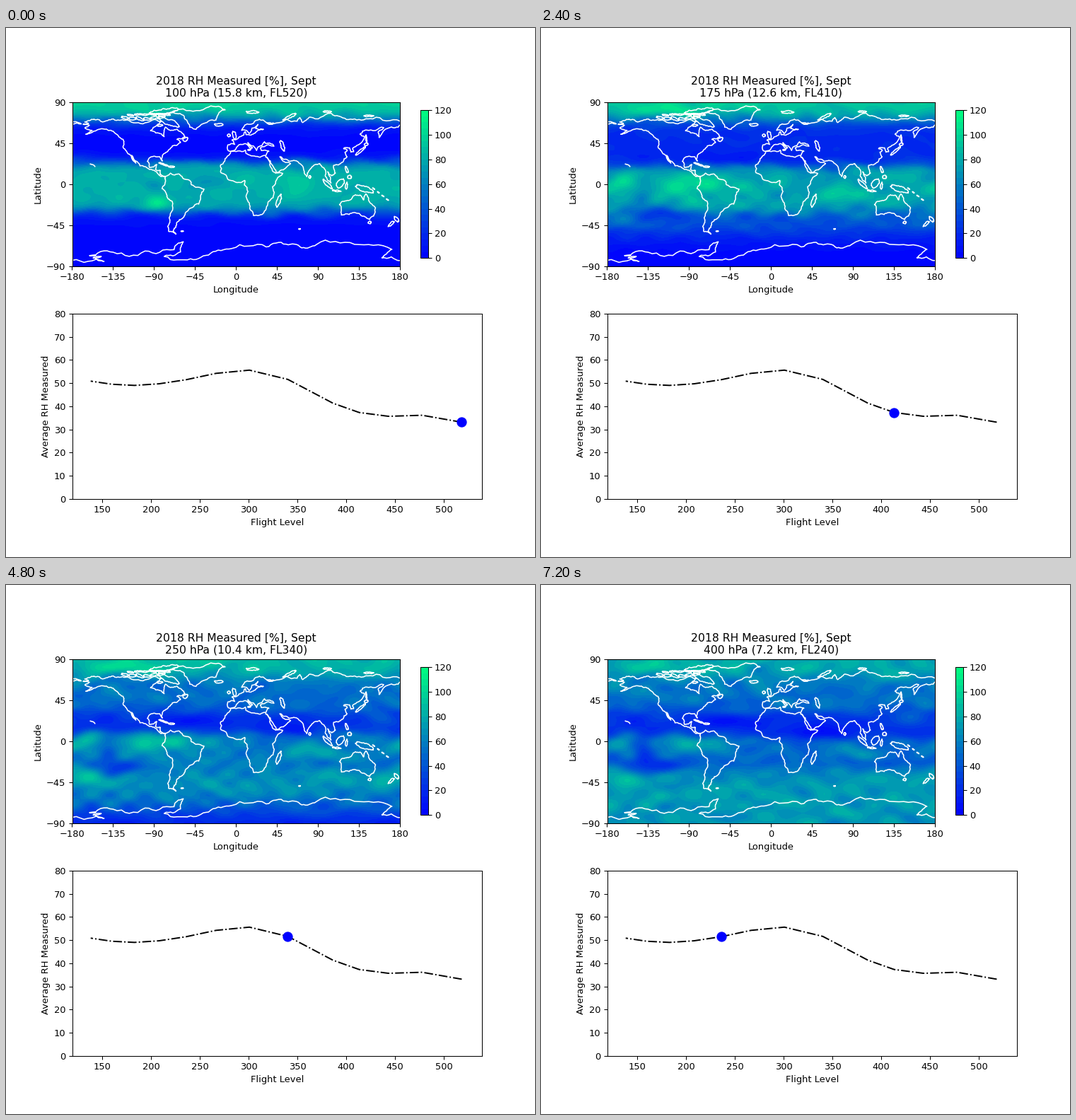
A matplotlib script for the animation above (8 s loop, 748x748 px).

```python
import numpy as np
import matplotlib.pyplot as plt
from matplotlib.animation import FuncAnimation

PRESSURES = [*range(100, 250, 25), *range(250, 601, 50)]
AVERAGE_RH = [33.1, 36.1, 35.65, 37.3, 41.3, 46.7, 51.6, 55.6, 54.2, 51.45,
              49.7, 49.0, 49.5, 50.85]
STEPS = 10
rng = np.random.default_rng(7)
lon, lat = np.meshgrid(np.linspace(-180, 180, 241), np.linspace(-90, 90, 121))

# Regional moist and dry areas: lon, lat, width, height, strength
HIGH = [(-86, -22, 14, 8, 28), (-90, 0, 14, 7, -13), (-33, 0, 18, 8, -16), (66, 0, 16, 10, 14)]
DEEP = [(-162, 0, 15, 10, 30), (-140, -12, 12, 16, -26), (-97, -1, 28, 13, 31),
        (-118, -30, 27, 9, -28), (-52, -3, 24, 12, 17), (84, -12, 22, 9, 18),
        (50, 9, 32, 9, -17), (-50, 23, 35, 8, -14), (-120, 81, 45, 6, 16),
        (-165, -42, 25, 8, 16), (150, 24, 26, 10, 14)]


def ease(p, start, end):
    t = np.clip((p - start) / (end - start), 0, 1)
    return t * t * (3 - 2 * t)


def step(x, edge, width):
    return 1 / (1 + np.exp((edge - x) / width))


def ripple(waves=60):
    """Smooth random field with a spread of about one, streaked along latitudes."""
    field = np.zeros_like(lon)
    for _ in range(waves):
        kx, ky = rng.integers(-10, 11), rng.uniform(4, 18)
        field += np.cos(np.radians(kx * lon + ky * lat) + rng.uniform(0, 2 * np.pi))
    return field / np.sqrt(waves / 2)


bend, detail, drift = ripple(), ripple(), ripple()


def humidity(p):
    """Tropical band, two middle latitudes and a northern cap, plus the regions."""
    y = lat + 1.2 * bend
    floor = 2 + 17 * ease(p, 100, 230)
    tropic = 82 - 32 * ease(p, 130, 320)
    north = 3 + 50 * ease(p, 120, 270)
    south = 3 + 68 * ease(p + 2.5 * np.minimum(0, y + 45), 90, 260)
    cap = 97 - 17 * ease(p, 100, 350)

    band = step(y, -30 + 8 * ease(p, 150, 320), 3.5) * step(-y, -24 + 21 * ease(p, 120, 320), 3)
    rh = floor + (tropic - floor) * band
    rh += (south - floor) * step(-y, 36 - 8 * ease(p, 100, 200), 4)
    rh += (north - floor) * step(y, 32, 4)
    rh += (cap - north) * step(y, 71, 4.5)

    depth = ease(p, 90, 210)
    for regions, weight in ((HIGH, 1 - depth), (DEEP, depth)):
        for x0, y0, w, h, strength in regions:
            dx = (lon - x0 + 180) % 360 - 180
            rh += weight * strength * np.exp(-(dx / w) ** 2 - ((lat - y0) / h) ** 2)
    turn = p / 150
    noise = detail * np.cos(turn) + drift * np.sin(turn)
    rh += (2 + 3 * depth) * noise * np.clip(rh / 50, 0, 1)
    return np.clip(rh, 0.5, 119)


fig, (sky, graph) = plt.subplots(2, 1, figsize=(8, 8), dpi=93.5)
layers = [sky.contourf(lon, lat, humidity(p), levels=np.arange(0, 121, 5), cmap="winter")
          for p in PRESSURES[:STEPS]]
fig.colorbar(layers[0], ax=sky, shrink=0.8, ticks=range(0, 121, 20))


def coast(*points):
    """Draw a shoreline through key points, roughened by midpoint displacement."""
    path = np.array(points, float)
    for _ in range(3):
        leg = np.diff(path, axis=0)
        normal = leg[:, ::-1] * [-1, 1]
        middle = path[:-1] + leg / 2 + normal * rng.uniform(-0.16, 0.16, (len(leg), 1))
        rough = np.empty((2 * len(path) - 1, 2))
        rough[::2], rough[1::2] = path, middle
        path = rough
    sky.plot(*path.T, color="white", lw=1.2)


def island(x, y, length, width, tilt=0):
    """Draw an uneven ellipse, tilted anticlockwise in degrees."""
    a = np.linspace(0, 2 * np.pi, 13)
    r = rng.uniform(0.75, 1.15, 13)
    r[-1] = r[0]
    u, v, t = length * r * np.cos(a), width * r * np.sin(a), np.radians(tilt)
    coast(*zip(x + u * np.cos(t) - v * np.sin(t), y + u * np.sin(t) + v * np.cos(t)))


# North America, west then east
coast((-156, 71), (-166, 68), (-162, 66.5), (-168, 65.6), (-161, 64.5), (-166, 61.6),
      (-158, 58.7), (-165, 54.6), (-151, 60), (-145, 60.4), (-135, 58), (-124, 49),
      (-124, 40), (-117, 32.7), (-110, 23), (-114.7, 31.5), (-105.5, 20), (-95, 16),
      (-87, 13), (-83, 8.4), (-78, 8))
coast((-78, 8.5), (-83.5, 10.5), (-83.2, 15), (-88.5, 16), (-87, 21.4), (-91, 18.7),
      (-95, 18.2), (-97.5, 25), (-94, 29.6), (-84, 30), (-81, 25.3), (-81, 31),
      (-75.7, 35.4), (-70, 42), (-61, 45.5), (-65, 49), (-56, 52), (-64.5, 60),
      (-69.5, 59), (-77.5, 62.5), (-79, 52), (-82, 55), (-94, 58.5), (-87, 64),
      (-82, 69), (-95, 68.5), (-115, 68), (-128, 70), (-141, 69.7), (-156, 71))
# Greenland
coast((-73, 78.3), (-58, 75.5), (-54, 70), (-51, 62.5), (-44, 60), (-38, 65.5), (-22, 70.3),
      (-19, 78), (-12, 81.5), (-33, 83.6), (-62, 82), (-73, 78.3))
# South America
coast((-78, 8), (-72, 12), (-62, 10.7), (-51, 4), (-49, -0.8), (-35.2, -5.5), (-39, -13),
      (-41, -22), (-48.5, -26), (-57, -35), (-62.2, -39), (-65, -42), (-66, -47),
      (-69, -51), (-66, -55), (-74, -52), (-75, -47), (-73.5, -37), (-70.2, -19),
      (-76, -14), (-81.3, -5), (-77.5, 4), (-78, 8))
# Africa
coast((32.6, 29.9), (37.3, 20), (43.2, 12), (51.2, 11.8), (40, -3), (40.6, -15),
      (35, -20), (32, -29), (27, -33.5), (19, -34.5), (15, -27), (12, -17), (13, -8),
      (9, -1), (9.5, 4), (-8, 4.5), (-16.7, 12.5), (-17, 21), (-10, 30), (-6, 35.8),
      (10, 37.2), (11, 33.5), (20, 30.8), (32.5, 31.2))
# Mediterranean, Black Sea and Atlantic Europe
coast((32.5, 31.2), (36, 36), (28, 36.7), (26.5, 39.5), (29, 41), (41.5, 41.5), (37, 45),
      (33.5, 44.5), (31, 46.5), (28, 42), (23.5, 40), (22.5, 36.8), (19.4, 41.5),
      (13, 45.5), (18, 40), (16, 38), (9, 44.3), (3.5, 43.3), (-1, 37.5), (-9, 37),
      (-9, 43), (-1.5, 43.5), (-4.6, 48.3), (3, 51.5), (8.5, 54), (10, 57.5),
      (11, 54.2), (21, 56), (24, 59), (30, 60), (21.5, 61), (24, 65.5), (17.5, 61.5),
      (14.5, 55.5), (11, 59), (6, 59), (12, 66), (25.5, 71))
# Northern and eastern Asia
coast((25.5, 71), (41, 67), (34, 66.7), (44, 67), (67, 69), (70, 73), (73, 67.5), (81, 73.5),
      (104, 77.7), (113, 74.5), (130, 71.5), (150, 71.5), (180, 69))
coast((-180, 69), (-170, 66), (-180, 65))
coast((180, 65), (178, 62.5), (163.5, 60), (157, 51), (156, 57.5), (162, 62), (143, 59.3),
      (136, 54.7), (141, 52), (135, 43.5), (128, 39.5), (129, 35.5), (126, 35),
      (124.5, 39.8), (118, 39), (122, 37), (119.5, 35), (121.8, 30), (117, 24),
      (107, 20.5), (109, 12), (105, 9), (100.5, 13.5), (104, 1.4))
# Southern Asia and Arabia
coast((104, 1.4), (98.3, 8), (97, 16.5), (91.8, 22.5), (87, 21.5), (80.2, 15), (77.5, 8.1),
      (72.8, 20), (67, 25), (57, 26), (48, 30), (51.5, 25), (59.8, 22.5), (52, 15.6),
      (44, 12.8), (39, 21.5), (35, 28), (32.6, 29.9))
# Australia
coast((113.7, -22.5), (115.5, -34), (124, -33.5), (131, -31.5), (138, -35), (146.5, -39),
      (151, -35), (153, -26), (146, -19), (142.5, -10.8), (140, -17.5), (136, -12),
      (131, -11.8), (122, -18), (113.7, -22.5))
# Antarctica
coast((-180, -83.8), (-145, -85), (-157, -81), (-148, -79.5), (-161, -78.5), (-135, -74.8),
      (-100, -73.5), (-68, -72), (-67, -68), (-58, -63.3), (-61, -74.5), (-79, -79.5),
      (-50, -82), (-28, -76), (-5, -70.8), (33, -69), (55, -66), (72, -70), (88, -66.5),
      (130, -66.2), (171, -71.8), (163, -78), (160, -81), (180, -84))

# Northern islands
island(-74, 68.3, 13, 3, -25)
island(-79, 80, 15, 2.6, 8)
for x in range(-122, -78, 8):
    island(x, rng.uniform(71, 73.5), 4.5, 1.4, rng.uniform(-20, 20))
    island(x + 6, rng.uniform(75, 77), 4, 0.8, rng.uniform(-10, 10))
island(-84, 64.5, 3, 1.2)
island(-56, 49, 3, 2, 30)
island(-19, 65, 5, 1.5)
island(18, 78.8, 7, 1.5)
island(59, 73.8, 9, 1.3, 25)
island(100, 79.5, 5, 1)
island(145, 74.8, 6, 0.7)
# Europe and the Atlantic, with the Caspian Sea
island(-2.2, 54, 4.8, 2, 110)
island(-8, 53.5, 1.8, 1.6)
island(51, 42, 5.6, 2, 110)
island(14, 37.5, 1.5, 0.6)
island(-79.5, 21.5, 5.5, 0.8, -18)
island(-71, 19, 3, 0.8)
island(-59.5, -51.8, 1.4, 0.4)
# Indian Ocean and Indonesia
island(46.8, -18.8, 7, 2.2, 72)
island(80.8, 7.8, 1, 1.7)
island(69.5, -49.3, 0.8, 0.4)
island(100.5, -0.3, 8, 1.7, -45)
island(110, -7.4, 5, 0.7, -8)
island(114, 1, 5.8, 3.8, 50)
island(121, -2, 3.8, 1.2, 80)
island(140.5, -5.3, 11, 2.6, -23)
# Pacific
island(121.5, 15.5, 3.6, 1.4, 110)
island(124.5, 7.8, 2.2, 1.8)
island(136, 36, 7.8, 1.4, 40)
island(142.7, 43.5, 2.2, 1.5, 30)
island(142.9, 50, 4.3, 0.7, 95)
island(146.6, -42.2, 1.8, 1.4)
island(176, -38.7, 3.5, 1.6, -55)
island(170.3, -43.5, 4.4, 1.4, 42)
for k in range(4):
    island(151 + 5 * k, -5 - 4 * k, 1.3, 0.3, -35)
coast((-160, 22), (-156.5, 20.9), (-155, 19.3))

sky.set(xlim=(-180, 180), ylim=(-90, 90), xlabel="Longitude", ylabel="Latitude",
        xticks=range(-180, 181, 45), yticks=range(-90, 91, 45), aspect="equal")
title = sky.set_title("")

height = 44.33 * (1 - (np.array(PRESSURES) / 1013.25) ** 0.1903)
flight = height / 0.03048
graph.plot(flight, AVERAGE_RH, "k-.")
dot, = graph.plot([], [], "bo", markersize=10)
graph.set(xlim=(119, 539.2), ylim=(0, 80), xlabel="Flight Level",
          ylabel="Average RH Measured")


def update(i):
    for j, layer in enumerate(layers):
        layer.set_visible(j == i)
    level = 10 * round(flight[i] / 10)
    title.set_text("2018 RH Measured [%], Sept\n"
                   f"{PRESSURES[i]} hPa ({height[i]:.1f} km, FL{level})")
    dot.set_data([flight[i]], [AVERAGE_RH[i]])
    return [*layers, title, dot]


anim = FuncAnimation(fig, update, frames=STEPS, interval=800, repeat=True, repeat_delay=0)
plt.show()
```
